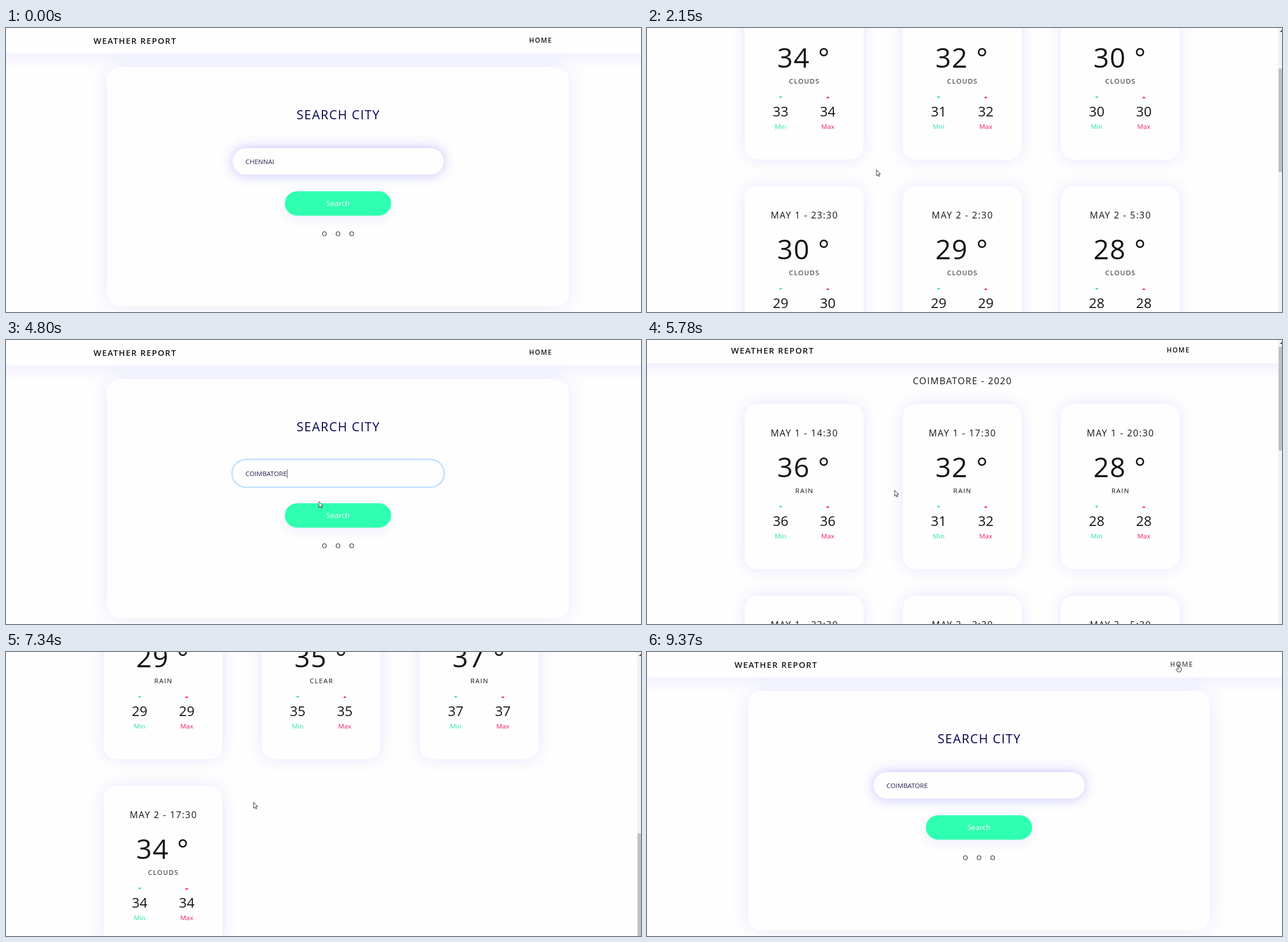
Animation of 1118x501 px, one loop 9.77 s. Source, as an HTML page with a canvas:

```html
<!DOCTYPE html>
<html lang="en">
<head>
<meta charset="utf-8">
<title>Weather report</title>
<style>
html, body { margin: 0; width: 100%; height: 100%; overflow: hidden; background: #fefefe; }
canvas { display: block; }
</style>
</head>
<body>
<canvas id="stage" width="1118" height="501"></canvas>
<script>
const ctx = document.getElementById('stage').getContext('2d');
const W = 1118, H = 501, LOOP = 9770;
const TICK = 77;                   // the screen refreshes in steps
const UNIT = W / 1536;             // page pixel to stage pixel
const LS = 2 * UNIT;
const PAPER = '#fefefe', INK = '#151515', GREEN = '#2be2a4', RED = '#f2215f';

const CITIES = {
  CHENNAI: {
    temps: '34 32 30 30 29 28 31 34 35 33'.split(' '),
    dips: i => i < 2 || i === 3,
    sky: () => 'CLOUDS'
  },
  COIMBATORE: {
    temps: '36 32 28 26 26 25 29 35 37 34'.split(' '),
    dips: i => i === 1,
    sky: i => i === 7 ? 'CLEAR' : i === 9 ? 'CLOUDS' : 'RAIN'
  }
};

const linear = k => k;
const easeIn = k => k * k;
const easeOut = k => 1 - (1 - k) ** 2;

const move = (at, steps, to, ease = linear) => ({ at, steps, to, ease });
const BUTTON = [583, 314], LOGO = [231, 25], FIELD = [487, 228], LINK = [936, 22];

const scrolls = [
  move(1410, 5, [440]), move(1960, 5, [0]),
  move(5780, 13, [676], easeIn), move(6930, 8, [910], easeOut), move(7730, 11, [0])
];
const pointerMoves = [
  move(70, 6, BUTTON), move(1180, 3, [404, 250]), move(2330, 6, LOGO), move(2990, 7, FIELD),
  move(4650, 3, BUTTON), move(5390, 3, [436, 265]), move(8600, 9, LINK)
];

// Position after all moves begun by time t, each advancing one step per tick
function follow(moves, from, t) {
  let pos = from;
  for (const { at, steps, to, ease } of moves) {
    if (t < at) break;
    const k = ease(Math.min(1, (Math.floor((t - at) / TICK) + 1) / steps));
    pos = pos.map((v, i) => v + (to[i] - v) * k);
  }
  return pos.map(Math.round);
}

function text(str, x, y, px, { color = INK, spacing = LS, weight = 400, align = 'center' } = {}) {
  ctx.font = `${weight} ${px * UNIT}px "Open Sans", sans-serif`;
  ctx.letterSpacing = spacing + 'px';
  ctx.textAlign = align;
  ctx.fillStyle = color;
  ctx.fillText(str, align === 'center' ? x + spacing / 2 : x, y);
  return ctx.measureText(str).width;
}

function box(x, y, w, h, r, fill, shadow, blur = 0, dy = 0) {
  ctx.save();
  if (shadow) {
    ctx.shadowColor = shadow;
    ctx.shadowBlur = blur;
    ctx.shadowOffsetY = dy;
  }
  ctx.fillStyle = fill;
  ctx.beginPath();
  ctx.roundRect(x, y, w, h, r);
  ctx.fill();
  ctx.restore();
}

function shape(points, fill, stroke) {
  ctx.beginPath();
  points.forEach(([x, y]) => ctx.lineTo(x, y));
  ctx.closePath();
  ctx.fillStyle = fill;
  ctx.fill();
  if (stroke) {
    ctx.strokeStyle = stroke;
    ctx.lineWidth = 0.9;
    ctx.stroke();
  }
}

function triangle(x, y, size, dir, fill) {
  shape([[x - size, y - size * dir / 2], [x + size, y - size * dir / 2], [x, y + size * dir / 2]], fill);
}

function header(dx, y, hover) {
  box(-30, y - 30, W + 60, 75, 0, PAPER, 'rgba(0,0,255,.07)', 29, 7);
  text('WEATHER REPORT', 154 + dx, y + 28, 20, { weight: 600, align: 'left' });
  text('HOME', 921 + dx, y + 26.3, 16, { weight: 600, align: 'left', color: hover ? '#555' : INK });
}

function query(t) {
  if (t < 3710) return 'CHENNAI';
  const typed = t < 4250
    ? Math.min(3, 1 + Math.floor((t - 3710) / 155))
    : 4 + Math.floor((t - 4250) / TICK);
  return 'COIMBATORE'.slice(0, typed);
}

function field(t) {
  const focused = t >= 3390 && t < 4840;
  const selected = t >= 3630 && t < 3710;
  if (focused) box(396.6, 209.6, 376.4, 51.4, 25.7, '#bfdeff');
  box(399, 212, 371.5, 46.7, 23.4, PAPER, focused ? '' : 'rgba(40,40,255,.29)', 22);
  if (selected) box(422, 228, 51, 15.5, 0, '#3390ff');
  const width = text(query(t), 421.6, 240.2, 16,
    { spacing: 0, align: 'left', color: selected ? '#fff' : '#252550' });
  if (focused && t >= 3710) box(422 + width, 228, 0.8, 15.5, 0, INK);
}

function home(t, hover) {
  box(178, 69, 813, 422, 22, PAPER, 'rgba(0,0,255,.09)', 36);
  header(0, 0, hover);
  text('SEARCH CITY', 584.5, 161, 30, { color: '#04044e' });
  field(t);
  box(491, 288, 187, 43, 21.5, '#2fffb0', 'rgba(0,0,255,.08)', 22, 5);
  text('Search', 584.5, 314.3, 18, { color: '#fff', spacing: 0 });
  for (let i = -1; i < 2; i++) text('O', 584.5 + i * 24, 367.2, 16, { spacing: 0 });
}

function limit(x, y, temp, label, color, dir) {
  triangle(x, y + 181.3, 3.2, dir, color);
  text(temp, x, y + 214.8, 33, { spacing: 0 });
  text(label, x, y + 236.5, 16, { color, spacing: 0 });
}

function card(x, y, time, temp, min, sky) {
  const mid = x + 104.5;
  box(x, y, 209, 291, 22, PAPER, 'rgba(0,0,255,.1)', 29);
  text(time, mid, y + 56.6, 22);
  text(temp + ' °', mid - 1, y + 128.5, 66);
  text(sky, mid, y + 157.3, 16);
  limit(mid - 41.3, y, min, 'Min', GREEN, 1);
  limit(mid + 41.7, y, temp, 'Max', RED, -1);
}

function scrollbar(scroll) {
  box(1111, 0, 7, H, 0, '#f1f1f1');
  box(1112, 10.6 + scroll * 0.3457, 6, 183, 0, '#c1c1c1');
  triangle(1117.5, 5.3, 3.5, -1, '#505050');
}

// Forecasts come every three hours from 14:30 on May 1
function timeLabel(i) {
  const hour = 14 + i * 3;
  return `MAY ${1 + Math.floor(hour / 24)} - ${hour % 24}:30`;
}

function results(city, scroll, hover) {
  const { temps, dips, sky } = CITIES[city];
  header(-6, -scroll, hover);
  text(city + ' - 2020', 554.7, 82 - scroll, 22);
  temps.forEach((temp, i) => {
    const x = 172 + (i % 3) * 278.3, y = 117 + Math.floor(i / 3) * 338 - scroll;
    card(x, y, timeLabel(i), temp, temp - dips(i), sky(i));
  });
  scrollbar(scroll);
}

const cursors = {
  arrow() {
    shape([[0, 0], [0, 10.6], [2.4, 8.4], [3.9, 11.8], [5.5, 11.1], [4, 7.8], [7, 7.5]], '#fff', '#222');
  },
  beam() {
    ctx.strokeStyle = '#333';
    ctx.lineWidth = 1;
    ctx.beginPath();
    [-4.5, 4.5].forEach(y => { ctx.moveTo(-2.5, y); ctx.lineTo(3, y); });
    ctx.moveTo(0.3, -4.5);
    ctx.lineTo(0.3, 4.5);
    ctx.stroke();
  },
  hand() {
    shape([[-1, 0.5], [0.6, 0.5], [0.8, 5], [4.6, 6], [4.8, 9], [3.6, 13], [-1.8, 13], [-4.6, 8.5], [-3.4, 7.4], [-1, 9]],
      '#fff', '#222');
  }
};

function pointer(kind, x, y) {
  ctx.save();
  ctx.translate(x, y);
  cursors[kind]();
  ctx.restore();
}

function draw(t) {
  const onHome = t < 720 || (t >= 2830 && t < 5030) || t >= 9370;
  const [scroll] = follow(scrolls, [0], t);
  const [x, y] = follow(pointerMoves, [600, 70], t);
  const within = (l, top, r, b) => x > l && x < r && y > top && y < b;
  const onLink = within(915, 12, 966, 36);

  ctx.fillStyle = PAPER;
  ctx.fillRect(0, 0, W, H);
  if (onHome) home(t, onLink);
  else results(t < 2830 ? 'CHENNAI' : 'COIMBATORE', scroll, onLink);

  const hidden = t < 70 || (t >= 3710 && t < 4650);
  if (hidden) return;
  let kind = 'arrow';
  if (onLink || within(150, 10, 300, 36) || (onHome && within(491, 288, 678, 331))) kind = 'hand';
  else if (onHome && within(399, 212, 771, 259)) kind = 'beam';
  pointer(kind, x, y);
}

const start = performance.now();
function frame() {
  draw((performance.now() - start) % LOOP);
  requestAnimationFrame(frame);
}
frame();
</script>
</body>
</html>
```
